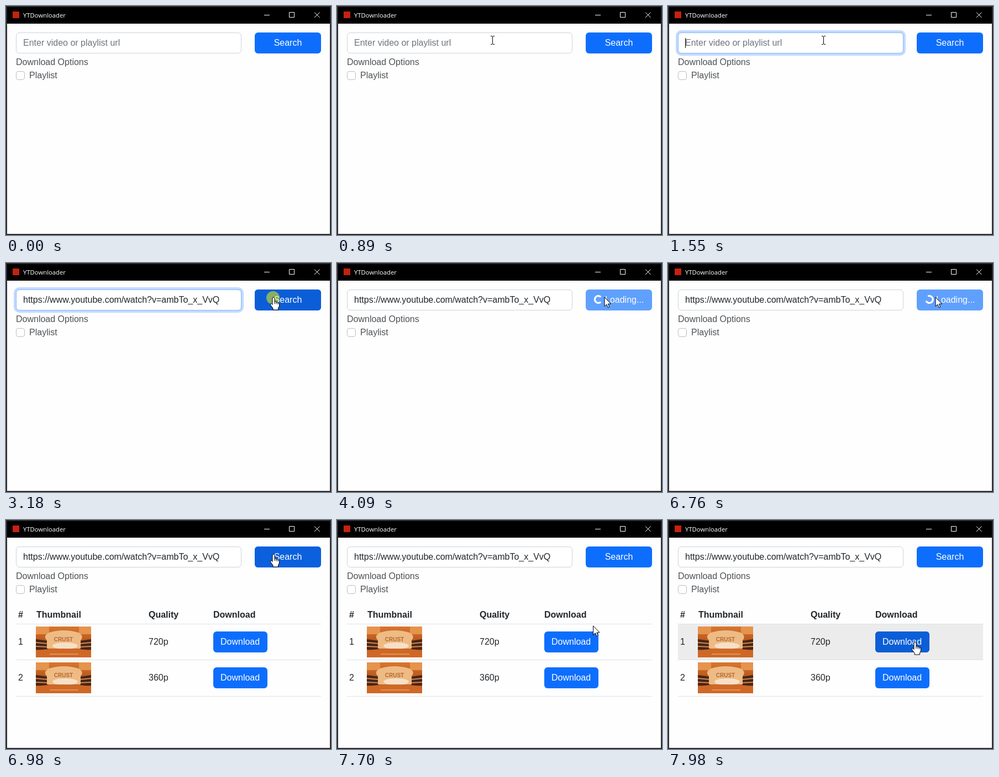
An HTML page that plays this animation: 588x415 px, repeating every 8000 ms.

```html
<!DOCTYPE html>
<html lang="en">
<head>
<meta charset="utf-8">
<title>YTDownloader</title>
<style>
  html, body { margin: 0; width: 100%; height: 100%; overflow: hidden; background: #2a2a2a; }
  svg { display: block; }
  text { font: 16px "Liberation Sans", Arial, sans-serif; fill: #212529; white-space: pre; }
  .title { font: 11.3px "Open Sans", "Noto Sans", sans-serif; fill: #fff; }
  .bold { font-weight: 700; }
  .light { fill: #fff; }
  .soft { fill: #4d5154; }
  .rule { fill: #dee2e6; }
  .base { fill: #0d6efd; }
  .hover { fill: #0b5ed7; }
  .pointer { fill: #fff; stroke: #000; stroke-linejoin: round; }
</style>
</head>
<body>
<svg id="stage" width="588" height="415" viewBox="0 0 588 415">
  <defs>
    <linearGradient id="warm" x2="0" y2="1">
      <stop offset="0" stop-color="#d9772f"/>
      <stop offset=".45" stop-color="#b9591f"/>
      <stop offset="1" stop-color="#c4611f"/>
    </linearGradient>
    <symbol id="thumb" viewBox="0 0 100 56">
      <rect width="100" height="56" fill="url(#warm)"/>
      <path d="M0 0H24V14H0ZM78 0H100V14H78Z" fill="#e6934d"/>
      <path d="M0 23L22 26V44L0 42ZM100 23L80 26V44L100 42Z" fill="#4a2412"/>
      <path d="M0 29L22 31M0 36L22 37M100 29L80 31M100 36L80 37" stroke="#c98a5a" stroke-width="2"/>
      <path d="M20 40V25Q12 17 24 11Q50 3 77 11Q88 17 81 25V40Z" fill="#eebb85"/>
      <ellipse cx="53" cy="35" rx="23" ry="6" fill="#fff" opacity=".55"/>
      <path d="M0 43Q50 37 100 43V56H0Z" fill="#cf6826"/>
      <path d="M25 50H77" stroke="#e9a264" stroke-width="1.5"/>
      <text x="50" y="27" text-anchor="middle" style="font:700 10px 'Liberation Sans',sans-serif;fill:#b5692f">CRUST</text>
    </symbol>
  </defs>

  <rect width="588" height="415" fill="#2a2a2a"/>
  <rect x="2" y="2" width="584" height="30"/>
  <rect x="2" y="32" width="584" height="381" fill="#fefefe"/>
  <rect x="12" y="10" width="12" height="12" fill="#c5220f"/>
  <text class="title" x="31" y="21">YTDownloader</text>
  <path d="M467 16.5H477M512.5 11.5H521.5V20.5H512.5ZM558 11.5L567.5 21M567.5 11.5L558 21" fill="none" stroke="#fff"/>

  <rect id="inputRing" x="16" y="46" width="412" height="42" rx="8" fill="none" stroke="#0d6efd" stroke-opacity=".25" stroke-width="4"/>
  <rect x="18.5" y="48.5" width="407" height="37" rx="5.5" fill="#fff" stroke="#ced4da"/>
  <rect id="inputEdge" x="18.5" y="48.5" width="407" height="37" rx="5.5" fill="none" stroke="#86b7fe"/>
  <text id="hint" x="31" y="72" style="fill:#6c757d">Enter video or playlist url</text>
  <text id="url" x="31" y="72">https://www.youtube.com/watch?v=ambTo_x_VvQ</text>
  <rect id="caret" y="58" width="1" height="18"/>

  <text class="soft" x="18" y="107">Download Options</text>
  <rect x="18.5" y="118.5" width="15" height="15" rx="3.5" fill="#fff" stroke="#bfbfbf"/>
  <text class="soft" x="42" y="131">Playlist</text>

  <rect id="searchRing" x="448" y="46" width="124" height="42" rx="8" fill="none" stroke="#3184fd" stroke-opacity=".5" stroke-width="4"/>
  <g id="search">
    <rect class="base" x="450" y="48" width="120" height="38" rx="6"/>
    <rect id="searchHover" class="hover" x="450" y="48" width="120" height="38" rx="6"/>
    <text id="searchLabel" class="light" x="510" y="72" text-anchor="middle">Search</text>
    <g id="loading">
      <path id="spinner" d="M4.53 4.53A6.4 6.4 0 1 1 4.53 -4.53" fill="none" stroke="#fff" stroke-width="3.2"/>
      <text class="light" x="485" y="72">Loading...</text>
    </g>
  </g>

  <g id="table"></g>

  <circle id="click" r="12" fill="#ff0" opacity=".5"/>
  <g id="cursor">
    <path id="arrow" class="pointer" d="M0 0V16.5L3.8 13L6.3 18.8L8.8 17.8L6.4 12.1H11.6Z"/>
    <path id="ibeam" d="M-3 -7.5H-1L.5 -6.5L2 -7.5H4M.5 -6.5V6.5M-3 7.5H-1L.5 6.5L2 7.5H4" fill="none" stroke="#000"/>
    <g id="hand">
      <path class="pointer" d="M-2 2Q-2 0 0 0T2 2V8Q4.5 7 5 9Q7.5 8 8 10Q10.5 9.5 10.5 12V16L8.5 20V23H-1V20L-5.5 14Q-6.5 11 -4 11.5L-2 13.5Z"/>
      <path d="M2 8V12M5 9V12.5M8 10V13" stroke="#000"/>
    </g>
  </g>
</svg>
<script>
const LOOP = 8000;
const CLICKS = [1350, 3180];
const FOCUS = 1350, PASTE = 1810, BLUR = 3180, LOAD = 3340, DONE = 6900;

// Bursts of screen updates: first time, last time, number of steps.
const BURSTS = [[270, 890, 10], [1350, 1550, 4], [1810, 1810, 1],
                [2350, 2900, 9], [3180, 7040, 56], [7430, 7980, 9]];

// Pointer stops: time, x, y.
const STOPS = [[200, 312, 425], [890, 281, 62], [2280, 281, 62], [2830, 484, 62],
               [7360, 484, 62], [7700, 464, 191], [7880, 447, 221]];

const $ = id => document.getElementById(id);
const clamp = v => Math.max(0, Math.min(1, v));
const smooth = p => p * p * (3 - 2 * p);
const ramp = (t, start) => smooth(clamp((t - start) / 150));
const within = (t, a, b) => t >= a && t < b;
const show = (id, on) => $(id).setAttribute('visibility', on ? 'visible' : 'hidden');
const fade = (id, v) => $(id).setAttribute('opacity', v);
const move = (id, x, y, turn = 0) =>
  $(id).setAttribute('transform', `translate(${x} ${y}) rotate(${turn})`);
const inside = ([x, y], left, top, right, bottom) => within(x, left, right) && within(y, top, bottom);

function buildTable() {
  const cell = (x, y, label, kind = '') => `<text class="${kind}" x="${x}" y="${y}">${label}</text>`;
  const rule = y => `<rect class="rule" x="18" y="${y}" width="552" height="1"/>`;
  const button = (y, kind, id = '') =>
    `<rect ${id} class="${kind}" x="375" y="${y}" width="98" height="38" rx="6"/>`;
  const row = (i, quality) => {
    const y = 189 + 65 * i;
    return cell(22, y + 37, i + 1) +
      `<use href="#thumb" x="54" y="${y + 4}" width="100" height="56"/>` +
      cell(258, y + 37, quality) + button(y + 13, 'base') +
      (i ? '' : button(y + 13, 'hover', 'id="saveHover"')) +
      cell(388, y + 37, 'Download', 'light');
  };
  const heads = [[22, '#'], [55, 'Thumbnail'], [258, 'Quality'], [375, 'Download']];
  $('table').innerHTML =
    '<rect id="rowHover" x="18" y="189" width="552" height="64" fill="#ececec"/>' +
    heads.map(([x, label]) => cell(x, 177, label, 'bold')).join('') +
    [188, 253, 319].map(rule).join('') + row(0, '720p') + row(1, '360p');
}

function tick(t) {
  const burst = BURSTS.filter(b => b[0] <= t).pop();
  if (!burst) return 0;
  const [start, end, count] = burst;
  if (count === 1) return start;
  const step = (end - start) / (count - 1);
  return start + step * Math.min(count - 1, Math.floor((t - start + 5) / step));
}

function pointer(t) {
  const next = STOPS.findIndex(s => s[0] > t);
  if (next === 0) return STOPS[0].slice(1);
  if (next < 0) return STOPS[STOPS.length - 1].slice(1);
  const [t0, x0, y0] = STOPS[next - 1], [t1, x1, y1] = STOPS[next];
  const p = (t - t0) / (t1 - t0);
  const e = t0 < 7000 ? smooth(p) : p;
  return [x0 + (x1 - x0) * e, y0 + (y1 - y0) * e];
}

function draw(time) {
  const t = tick(time);
  const at = pointer(t);
  const busy = within(t, LOAD, DONE);
  const pasted = t >= PASTE;

  const focus = ramp(t, FOCUS) - ramp(t, BLUR + 50);
  fade('inputRing', focus);
  fade('inputEdge', focus);
  show('hint', !pasted);
  show('url', pasted);
  show('caret', within(t, 1400, 2350) || within(t, 2880, BLUR));
  $('caret').setAttribute('x', pasted ? 386 : 31);

  fade('searchRing', ramp(t, BLUR + 20) - ramp(t, LOAD));
  fade('searchHover', ramp(t, 2640) - ramp(t, LOAD) + ramp(t, DONE - 40) - ramp(t, 7460));
  fade('search', busy ? 0.65 : 1);
  show('searchLabel', !busy);
  show('loading', busy);
  move('spinner', 472.8, 66, (t - LOAD) / 750 * 360);

  show('table', t >= DONE);
  fade('rowHover', t >= DONE && inside(at, 18, 192, 570, 253) ? 1 : 0);
  fade('saveHover', ramp(t, 7750));

  const kind = inside(at, 18, 48, 426, 86) ? 'ibeam'
    : inside(at, 450, 48, 570, 86) && !busy || t >= DONE && inside(at, 375, 202, 473, 240) ? 'hand'
    : 'arrow';
  for (const id of ['arrow', 'ibeam', 'hand']) show(id, id === kind);
  move('cursor', ...at);
  move('click', at[0] - 1, at[1] + 1);
  show('click', CLICKS.some(c => within(t, c, c + 190)));
}

buildTable();
const began = performance.now();
function frame() {
  draw((performance.now() - began) % LOOP);
  requestAnimationFrame(frame);
}
frame();
</script>
</body>
</html>
```
